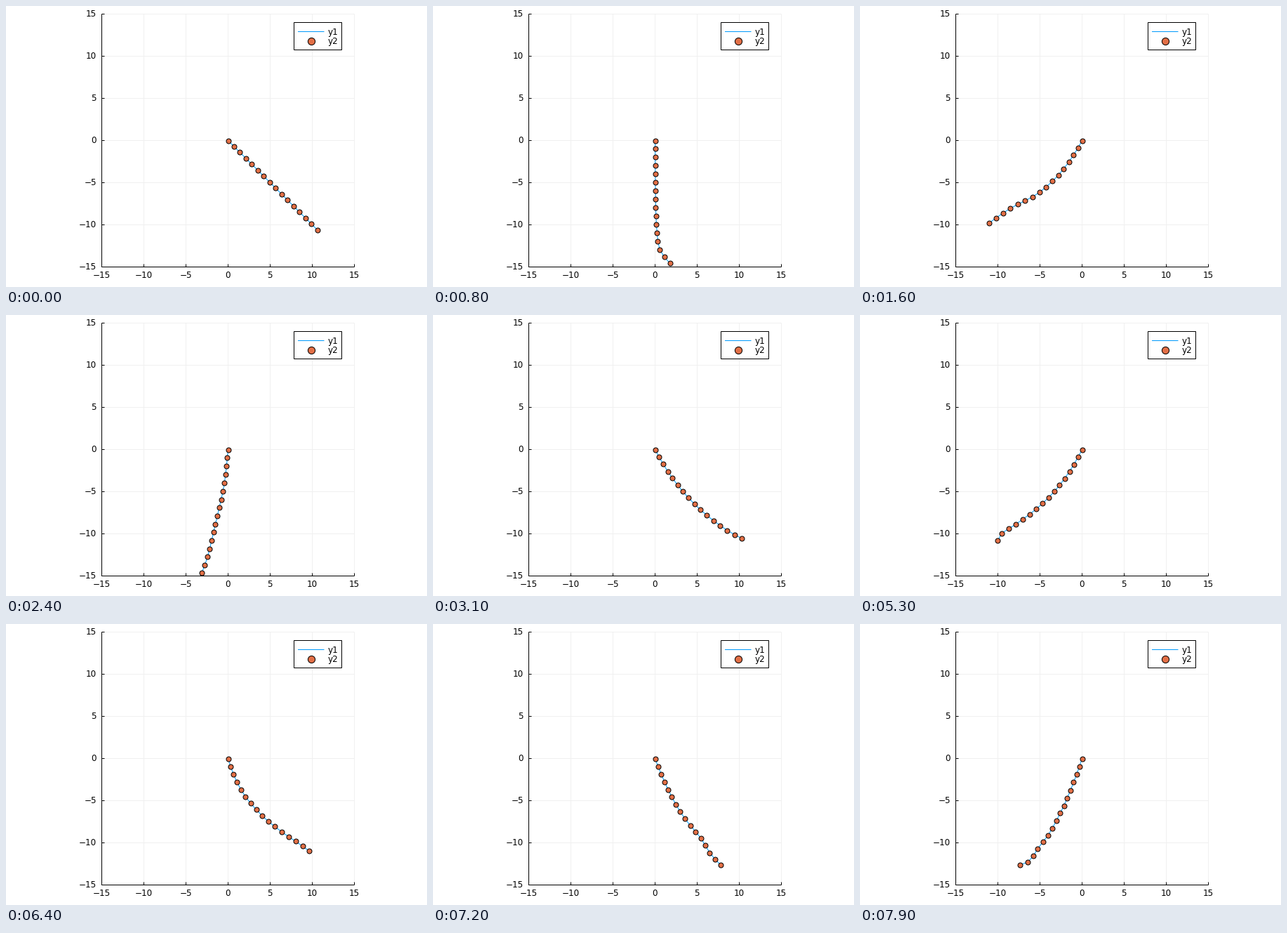
Recreate the animation shown at these times as a matplotlib script. Size 600 by 400 pixels, loop 8000 ms.

```python
import numpy as np
import matplotlib.pyplot as plt
from matplotlib.animation import FuncAnimation
from matplotlib.patches import Rectangle

plt.rcParams["path.snap"] = False

FRAMES, INTERVAL = 80, 100
LINKS, GRAVITY = 15, 10.0
STEP, SUBSTEPS = 0.2, 40          # simulated seconds per frame
PX = 0.72                         # points per pixel at 100 dpi
CX, CY, UNIT = 316.5, 191.5, 12.0
BLUE, ORANGE, GRID = "#009afa", "#e26f46", "#f0f0f0"

# Chain of unit point masses on unit rods, hinged at the origin
idx = np.arange(LINKS)
below = LINKS - np.maximum.outer(idx, idx)
weight = GRAVITY * (LINKS - idx)


def deriv(s):
    th, om = s
    d = th[:, None] - th[None, :]
    rhs = -(below * np.sin(d)) @ om**2 - weight * np.sin(th)
    return np.array([om, np.linalg.solve(below * np.cos(d), rhs)])


def rk4(s, h):
    k1 = deriv(s)
    k2 = deriv(s + h / 2 * k1)
    k3 = deriv(s + h / 2 * k2)
    k4 = deriv(s + h * k3)
    return s + h / 6 * (k1 + 2 * k2 + 2 * k3 + k4)


def simulate():
    s = np.array([np.full(LINKS, np.pi / 4), np.zeros(LINKS)])
    poses = []
    for _ in range(FRAMES):
        poses.append(s[0])
        for _ in range(SUBSTEPS):
            s = rk4(s, STEP / SUBSTEPS)
    return poses


def joints(th):
    x = np.concatenate([[0], np.cumsum(np.sin(th))])
    y = np.concatenate([[0], np.cumsum(np.cos(th))])
    return CX + UNIT * x, CY + UNIT * y


poses = simulate()

fig = plt.figure(figsize=(6, 4), dpi=100, facecolor="white")
ax = fig.add_axes([0, 0, 1, 1])
ax.axis("off")


def stroke(x, y, color="black", **kw):
    return ax.plot(x, y, color=color, lw=PX, solid_capstyle="butt", **kw)[0]


def label(x, y, text, **kw):
    ax.text(x, y, text, family="DejaVu Sans", size=12 * PX, va="baseline", **kw)


def dots(x, y, size, **kw):
    return ax.scatter(x, y, s=(size * PX) ** 2, fc=ORANGE, ec="black", lw=PX, **kw)


half = 15 * UNIT
left, right = CX - half, CX + half
top, bottom = CY - half, CY + half
ticks = range(-15, 16, 5)

for v in ticks:
    gx, gy = CX + UNIT * v, CY - UNIT * v
    stroke([gx, gx], [top, bottom], GRID)
    stroke([left, right], [gy, gy], GRID)
for v in ticks:
    gx, gy = CX + UNIT * v, CY - UNIT * v
    stroke([gx, gx], [bottom, bottom - 4])
    stroke([left, left + 4], [gy, gy])
    text = str(v).replace("-", "\u2212")
    label(gx - 0.3, 386.9, text, ha="center")
    label(128.9, gy + 3.8, text, ha="right")
stroke([left, left, right], [top, bottom, bottom])

area = Rectangle((left, top), 2 * half, 2 * half, fc="none", ec="none")
ax.add_patch(area)
chain = stroke([], [], BLUE, zorder=3)
beads = dots([], [], 7, zorder=4)
for part in (chain, beads):
    part.set_clip_path(area)

ax.add_patch(Rectangle((410.5, 23.5), 68, 39, fc="white", ec="black", lw=PX, zorder=5))
stroke([416, 453.5], [36.5, 36.5], BLUE, zorder=6)
dots([434.8], [49.6], 10.2, zorder=6)
label(458.8, 41, "y1", zorder=6)
label(458.8, 54, "y2", zorder=6)

ax.set(xlim=(0, 600), ylim=(400, 0))


def update(i):
    x, y = joints(poses[i])
    chain.set_data(x, y)
    beads.set_offsets(np.column_stack([x, y]))
    return chain, beads


anim = FuncAnimation(fig, update, frames=FRAMES, interval=INTERVAL,
                     init_func=lambda: update(0), repeat=True, repeat_delay=0)
plt.show()
```
